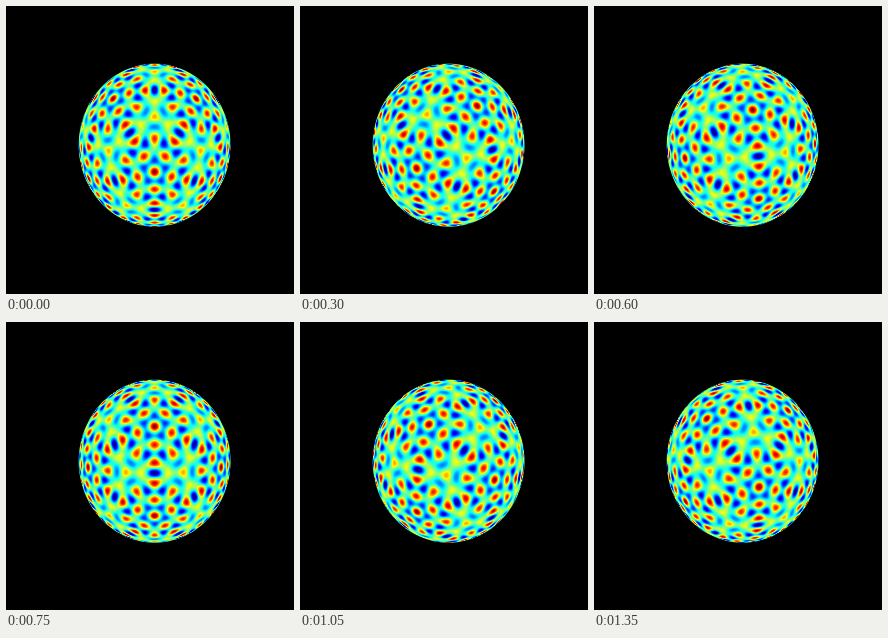
An HTML page with a canvas for the animation above (1.5 s loop, 288 by 288 pixels).

```html
<!DOCTYPE html>
<html lang="en">
<head>
<meta charset="utf-8">
<title>Icosahedral harmonic</title>
<style>
  html, body { margin: 0; width: 100%; height: 100%; overflow: hidden; background: #000; }
  canvas { display: block; width: 288px; height: 288px; }
</style>
</head>
<body>
<canvas id="stage" width="288" height="288"></canvas>
<script>
const SIZE = 288, STEPS = 10, STEP_MS = 150;
const DEGREE = 30, EDGE_WEIGHT = 0.6, TURN = 120;
const RAD = Math.PI / 180;
const view = { cx: 148.6, cy: 139.2, rx: 75.9, ry: 81.5, tilt: 28.8 * RAD, distance: 16 };

const ctx = document.getElementById('stage').getContext('2d');
const clamp = v => Math.max(0, Math.min(1, v));
const dot = (a, b) => a[0] * b[0] + a[1] * b[1] + a[2] * b[2];

function direction(lat, az) {
  const c = Math.cos(lat * RAD);
  return [c * Math.sin(az * RAD), c * Math.cos(az * RAD), Math.sin(lat * RAD)];
}

function legendre(n, x) {
  let before = 1, value = x;
  for (let k = 2; k <= n; k++) {
    [before, value] = [value, ((2 * k - 1) * x * value - (k - 1) * before) / k];
  }
  return value;
}

// The degree is even, so the table only needs |x|.
const TABLE = 8000;
const zonal = Float64Array.from({ length: TABLE + 2 }, (_, i) => legendre(DEGREE, Math.min(1, i / TABLE)));
function wave(x) {
  const p = Math.min(1, Math.abs(x)) * TABLE, i = Math.floor(p);
  return zonal[i] + (zonal[i + 1] - zonal[i]) * (p - i);
}

// Icosahedron with a three-fold axis upright: six vertex axes, fifteen edge axes.
const corners = [0, 120, 240].flatMap(az => [direction(10.812, az), direction(52.623, az + 60)]);
const edges = [];
corners.forEach((a, i) => corners.slice(i + 1).forEach(b => {
  const s = Math.sign(dot(a, b));
  const sum = a.map((v, k) => v + s * b[k]);
  const len = Math.hypot(...sum);
  edges.push(sum.map(v => v / len));
}));

function harmonic(p) {
  let v = 0, e = 0;
  for (const a of corners) v += wave(dot(a, p));
  for (const a of edges) e += wave(dot(a, p));
  return v / corners.length - EDGE_WEIGHT * e / edges.length;
}
const high = harmonic(corners[0]), low = harmonic(edges[0]);

function jet(v) {
  return [3, 2, 1].map(c => 255 * clamp(1.5 - Math.abs(4 * v - c)));
}

// Visible sphere points, found by casting a ray through each pixel.
const pixels = [];
const { distance: D, tilt } = view, limb = Math.sqrt(D * D - 1);
for (let y = 0; y < SIZE; y++) {
  for (let x = 0; x < SIZE; x++) {
    let nx = (x + 0.5 - view.cx) / view.rx, ny = (view.cy - y - 0.5) / view.ry;
    const r = Math.hypot(nx, ny), cover = clamp((1 - r) * 78 + 0.5);
    if (!cover) continue;
    if (r > 1) { nx /= r; ny /= r; }
    const u = nx / limb, v = ny / limb, q = 1 + u * u + v * v;
    const w = (D - Math.sqrt(Math.max(0, D * D - q * (D * D - 1)))) / q;
    const px = u * w, py = v * w, pz = D - w;
    const front = pz * Math.cos(tilt) - py * Math.sin(tilt);
    const up = py * Math.cos(tilt) + pz * Math.sin(tilt);
    pixels.push({ at: 4 * (y * SIZE + x), px, front, up, cover });
  }
}

function render(step) {
  const image = ctx.createImageData(SIZE, SIZE), data = image.data;
  for (let i = 3; i < data.length; i += 4) data[i] = 255;
  const a = step * TURN / STEPS * RAD, c = Math.cos(a), s = Math.sin(a);
  for (const { at, px, front, up, cover } of pixels) {
    const value = harmonic([px * c + front * s, front * c - px * s, up]);
    const color = jet(clamp((value - low) / (high - low)));
    for (let k = 0; k < 3; k++) data[at + k] = color[k] * cover;
  }
  return image;
}

const images = Array.from({ length: STEPS }, (_, step) => render(step));
const start = performance.now();
function draw() {
  const elapsed = Math.max(0, performance.now() - start);
  ctx.putImageData(images[Math.floor(elapsed / STEP_MS) % STEPS], 0, 0);
  requestAnimationFrame(draw);
}
draw();
</script>
</body>
</html>
```
